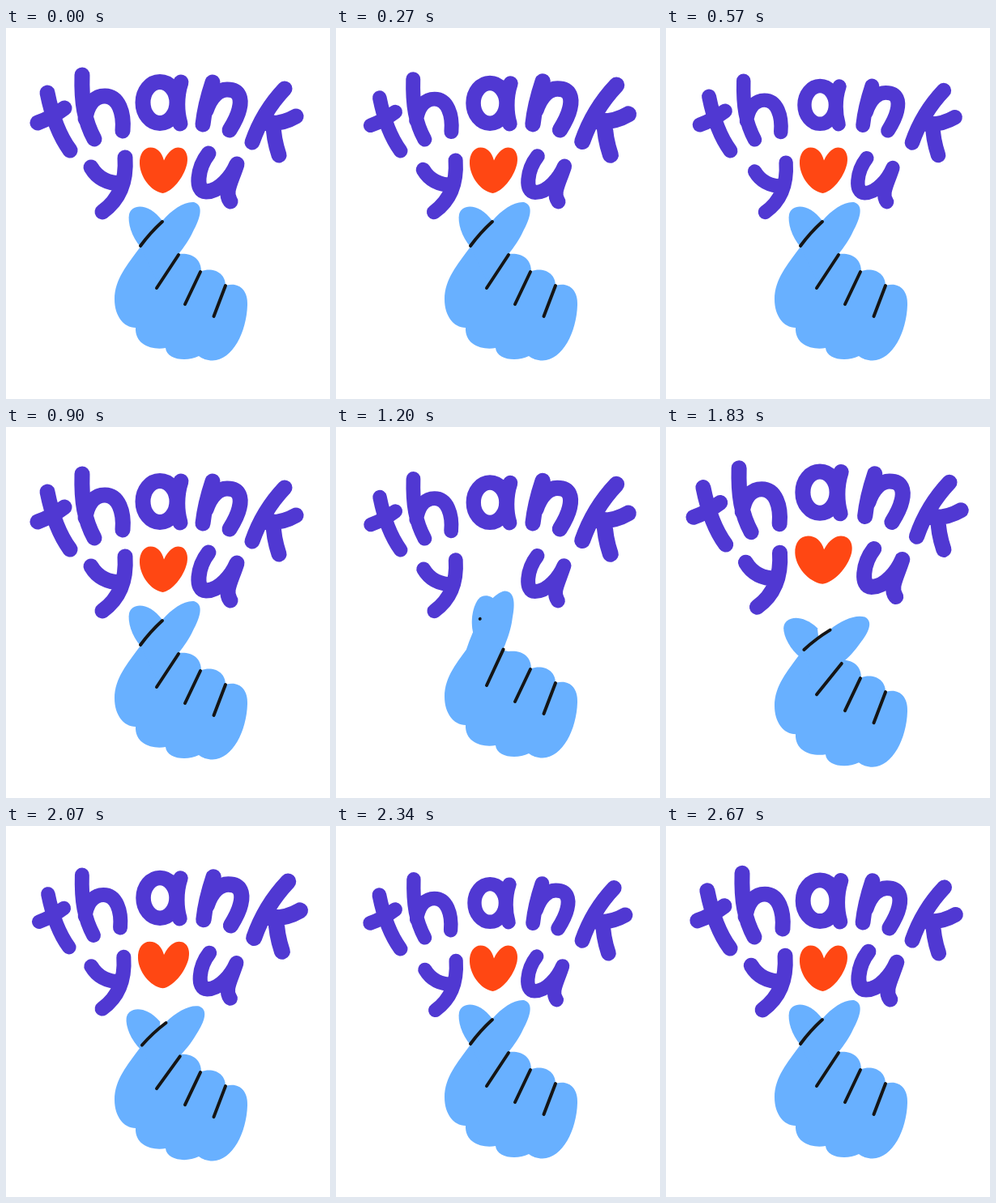
Animation, 400 px wide and 458 px high, one loop 2700 ms. Source, as an HTML page with a canvas:

```html
<!DOCTYPE html>
<html lang="en">
<head>
<meta charset="utf-8">
<title>thank you</title>
<style>
html, body { margin: 0; width: 100%; height: 100%; overflow: hidden; background: #fff; }
canvas { display: block; }
</style>
</head>
<body>
<canvas id="stage" width="400" height="458"></canvas>
<script>
const LOOP = 2700, WAVE = 900, TAU = Math.PI * 2;
const PURPLE = '#5038d2', RED = '#ff4713', BLUE = '#68b0ff', BLACK = '#151515';
const ctx = document.getElementById('stage').getContext('2d');
ctx.lineCap = ctx.lineJoin = 'round';

// each letter breathes around its foot (x, y); the first five form the arched row
const letters = [
  { x: 88, y: 161, d: 'M51 80C56 105 65 132 79 151M39 117Q56 111 72 99' },
  { x: 116, y: 147, d: 'M94 58C93 92 97 115 109 137M98 112C101 92 111 84 122 84C139 84 146 105 144 127' },
  { x: 192, y: 127, d: 'M211 92A21 25.5 0 1 1 169 92A21 25.5 0 1 1 211 92M216 67C210 85 211 105 215 118' },
  { x: 245, y: 136, d: 'M255 67C249 85 245 100 243 119M247 102C253 84 263 76 273 76C289 76 291 88 288 100C286 109 281 118 276 126' },
  { x: 300, y: 160, d: 'M344 75C325 95 313 115 304 141M318 117C332 119 346 116 358 109M330 117C330 130 333 145 337 157' },
  { x: 160, y: 232, d: 'M105 172C112 184 124 192 143 192M147 160C149 190 140 212 119 227' },
  { x: 225, y: 222, d: 'M250 155C236 173 233 202 247 202C264 202 279 182 285 168C278 190 269 203 277 214' }
].map((letter, i) => ({
  ...letter,
  path: new Path2D(letter.d),
  phase: i < 5 ? i * .085 - .07 : .04,
  push: (letter.x - 192) * (i < 5 ? .05 : .2)
}));

const heart = new Path2D('M.5-12C6-24 13-28 18-28C28-28 31-17 29-8C25 10 10 27-1 28.5C-16 26-29 8-29.5-8C-30-20-24-28-16-28C-8-28-2-22 .5-12Z');
const palm = new Path2D(`M134 335C134 310 150 292 166 270L213 279C228 277 241 284 241 300
  C256 295 271 302 271 318C286 313 299 322 298 342C297 375 280 410 255 410.5C248 410.5 242 408 238 405
  C222 413 198 409 197 395C180 398 159 391 160 370C145 370 134 355 134 335Z`);
const index = new Path2D('M166 270Q178 253 193 238C205 224 220 214 232 215C246 219 238 238 231 251C226 262 220 270 213 279L185 310Z');
const thumb = new Path2D('M166 270C155 258 150 240 152 230C155 217 176 215 193 238L190 275Z');

// time, hand drop, index and thumb angle in degrees, outward burst, heart size
const keys = [
  [0, 0, 0, 0, 0, 1],
  [1050, 0, 0, 0, 0, 1],
  [1180, -2, -17, 28, 0, 0],
  [1480, -2, -17, 28, 0, 0],
  [1590, 6.5, -3, 7, .35, .62],
  [1730, 11, 11, -11, 1.05, 1],
  [1840, 9, 11, -11, 1, 1],
  [2280, 0, 0, 0, 0, 1],
  [LOOP, 0, 0, 0, 0, 1]
];
const sparks = [[169, 197, 158, 193], [168, 209, 149, 203], [212, 192, 219, 187], [221, 200, 240, 189]];

// smooth curve through the keys, flat where a value turns or rests
function poseAt(t) {
  let i = 0;
  while (t >= keys[i + 1][0]) i++;
  const a = keys[i], b = keys[i + 1], span = b[0] - a[0], u = (t - a[0]) / span;
  const slope = (j, k) => {
    const p = keys[j - 1], c = keys[j], n = keys[j + 1];
    if (!p || !n || (n[k] - c[k]) * (c[k] - p[k]) <= 0) return 0;
    return (n[k] - p[k]) / (n[0] - p[0]) * span;
  };
  const ease = u * u * (3 - 2 * u);
  const [, drop, indexAngle, thumbAngle, burst, size] = a.map((v, k) => v + (b[k] - v) * ease
    + slope(i, k) * u * (1 - u) ** 2 - slope(i + 1, k) * u * u * (1 - u));
  return { drop, indexAngle, thumbAngle, burst, size };
}

function placed(draw, x, y, sx = 1, sy = sx) {
  ctx.save();
  ctx.translate(x, y);
  ctx.scale(sx, sy);
  draw();
  ctx.restore();
}

function turned(degrees, x, y, draw) {
  ctx.save();
  ctx.translate(x, y);
  ctx.rotate(degrees * TAU / 360);
  ctx.translate(-x, -y);
  draw();
  ctx.restore();
}

function line(x0, y0, x1, y1, bend = 0) {
  ctx.beginPath();
  ctx.moveTo(x0, y0);
  ctx.quadraticCurveTo((x0 + x1) / 2 + (y1 - y0) * bend, (y0 + y1) / 2 - (x1 - x0) * bend, x1, y1);
  ctx.stroke();
}

function drawLetters(t, burst) {
  ctx.strokeStyle = PURPLE;
  ctx.lineWidth = 19;
  for (const { x, y, path, phase, push } of letters) {
    const size = 1 + .047 * (Math.cos(TAU * (t / WAVE - phase)) - Math.cos(TAU * phase));
    const lift = 11 - Math.abs(push);
    placed(() => {
      ctx.translate(-x, -y);
      ctx.stroke(path);
    }, x + push * burst, y - lift * burst, size);
  }
}

function drawHeart({ size, burst }) {
  if (size < .02) return;
  ctx.fillStyle = RED;
  placed(() => ctx.fill(heart), 194.5, 175.5 - 11.5 * burst + 36 * (1 - size),
    size * (1 + .19 * burst), size * (1 + .05 * burst));
}

function drawHand({ drop, indexAngle, thumbAngle }) {
  const shown = Math.min(1, 1 + indexAngle / 17);
  ctx.fillStyle = BLUE;
  ctx.strokeStyle = BLACK;
  ctx.lineWidth = 4;
  placed(() => {
    ctx.fill(palm);
    turned(thumbAngle, 195, 270, () => ctx.fill(thumb));
    turned(indexAngle, 185, 290, () => {
      ctx.fill(index);
      line(193 - 27 * shown, 239 + 30 * shown, 193, 239, .05);
    });
    turned(indexAngle / 2, 186, 321, () => line(186, 321, 213, 280));
    line(221, 341, 240, 301);
    line(256.5, 356, 271, 318);
  }, 0, drop);
}

function drawSparks(t) {
  const u = (t - 1530) / 150;
  if (u <= 0 || u >= 1) return;
  const length = u < .4 ? u / .4 : (1 - u) / .6;
  ctx.strokeStyle = RED;
  ctx.lineWidth = 2;
  for (const [x0, y0, x1, y1] of sparks) {
    const dx = x1 - x0, dy = y1 - y0, shift = (u - .4) * 20 / Math.hypot(dx, dy);
    const x = x1 + dx * shift, y = y1 + dy * shift;
    line(x - dx * length, y - dy * length, x, y);
  }
}

function frame(now) {
  const t = now % LOOP, pose = poseAt(t);
  ctx.fillStyle = '#fff';
  ctx.fillRect(0, 0, 400, 458);
  drawLetters(t, pose.burst);
  drawHeart(pose);
  drawHand(pose);
  drawSparks(t);
  requestAnimationFrame(frame);
}
requestAnimationFrame(frame);
</script>
</body>
</html>
```
